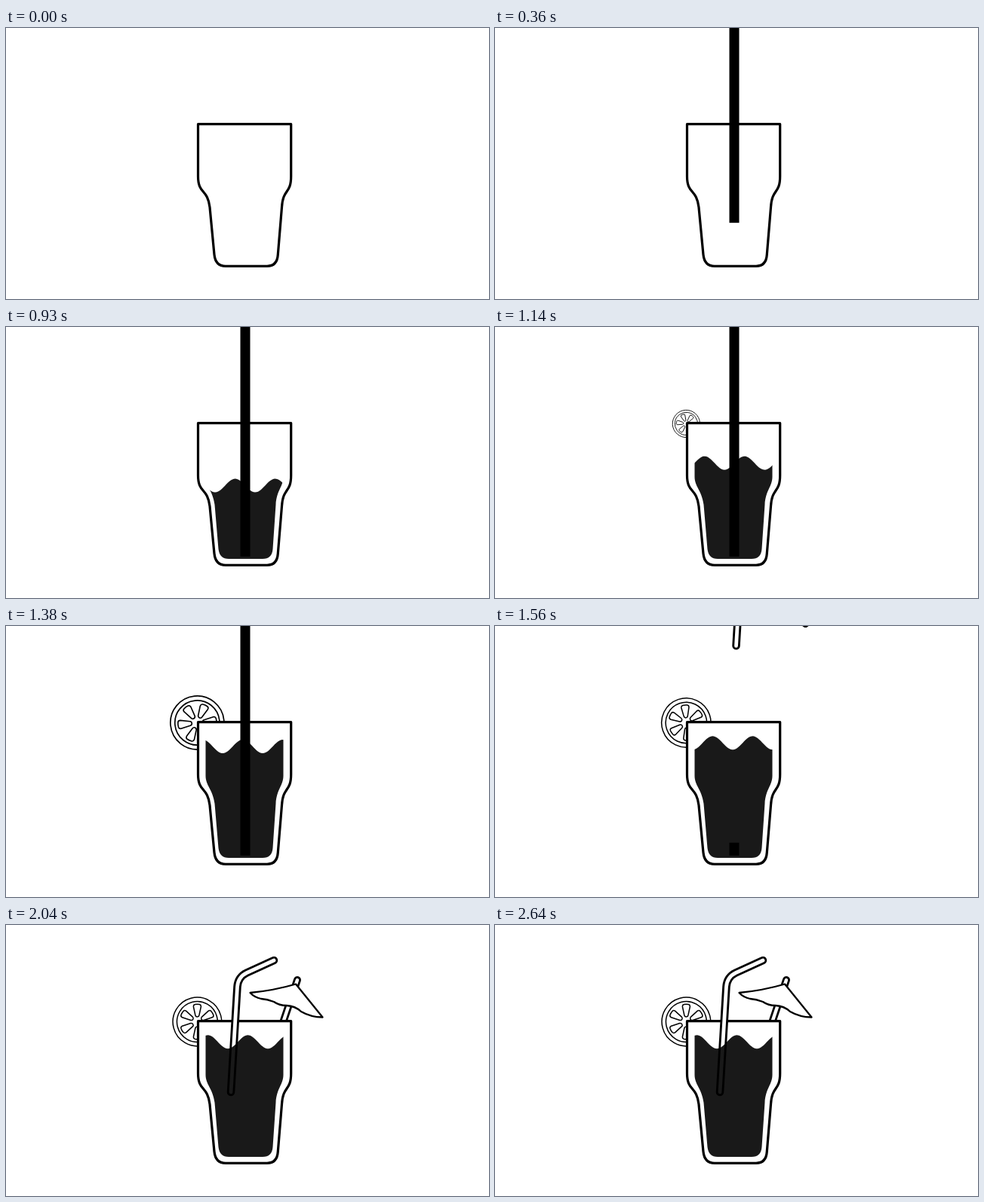
Write an HTML page that moves like this. It is 640x360 px and loops after 2700 ms.

```html
<!DOCTYPE html>
<html lang="en">
<head>
<meta charset="utf-8">
<title>Drink</title>
<style>
  html, body { margin: 0; height: 100%; overflow: hidden; background: #fff; }
  svg { display: block; width: 100%; height: 100%; }
  path, line, circle { fill: none; stroke: #000; }
  .tube path { stroke-linecap: round; }
  .tube .core { stroke: #fff; }
</style>
</head>
<body>
<svg viewBox="0 0 640 360">
  <defs>
    <clipPath id="inside">
      <path d="M264.500 128H367.500V199C367.500 212 358.500 217 357.500 236L353.500 295Q352.500 308 340 308H295Q283 308 281.500 295L276.500 236C274 217 264.500 212 264.500 199Z"/>
    </clipPath>
    <path id="segment" stroke-width="1.500" stroke-linejoin="round"
          d="M8.500 -2.500L20 -5Q22.500 -5.200 23 -3Q23.600 0 23 3Q22.500 5.200 20 5L8.500 2.500Q6.500 2 6.500 0Q6.500 -2 8.500 -2.500Z"/>
  </defs>

  <g id="lemon">
    <circle r="32.300" stroke-width="1.500"/>
    <circle r="26.900" stroke-width="1.500"/>
    <g id="segments"></g>
  </g>

  <g id="umbrella" class="tube">
    <path d="M386 73L330 240" stroke-width="10"/>
    <path class="core" d="M386 73L330 240" stroke-width="4.400"/>
    <path d="M323.500 90Q355 87 384 78.500Q399 97 419.500 122.500Q404 122.500 391 115Q383 107.500 372 107Q362 107 355 102Q346 98.500 338 98Q329 96 323.500 90Z"
          style="fill:#fff" stroke-width="2.300" stroke-linejoin="round"/>
  </g>

  <path d="M254.500 127.700H377.700V197C377.700 221 367 213 365.500 238L360.300 301Q359.300 316.300 346 316.300H291Q277.500 316.300 276 301L270 238C267 213 254.500 221 254.500 197Z"
        style="fill:#fff" stroke-width="3.200" stroke-linejoin="round"/>

  <line id="stream" x1="317" x2="317" stroke-width="13"/>
  <g id="straw" class="tube">
    <path d="M355 47L319 63.500Q307.500 69 306.500 82L298 222" stroke-width="10.500"/>
    <path class="core" d="M355 47L319 63.500Q307.500 69 306.500 82L298 222" stroke-width="4.800"/>
  </g>
  <g clip-path="url(#inside)">
    <path id="liquid" style="fill:#000;fill-opacity:.9;stroke:none"/>
  </g>
</svg>
<script>
const LOOP = 2700;
const $ = id => document.getElementById(id);
const progress = (t, from, to) => Math.min(1, Math.max(0, (t - from) / (to - from)));
const easeInOut = p => (1 - Math.cos(Math.PI * p)) / 2;
const easeOut = p => Math.sin(Math.PI * p / 2);
const easeOutBack = p => 1 + 2.70158 * (p - 1) ** 3 + 1.70158 * (p - 1) ** 2;

$('segments').innerHTML = [0, 60, 120, 180, 240, 300]
  .map(a => `<use href="#segment" transform="rotate(${a})"/>`).join('');

// Horizontal place of one wave trough as [time, x]
const drift = [[420, 211], [720, 250], [1140, 304], [1380, 340], [1770, 400]];

function troughAt(t) {
  let x = drift[0][1];
  for (let i = 1; i < drift.length; i++) {
    const [t0, x0] = drift[i - 1], [t1, x1] = drift[i];
    x += (x1 - x0) * progress(t, t0, t1);
  }
  return x;
}

function liquidPath(t) {
  const level = 312 - 156.7 * easeOut(progress(t, 420, 1560));
  const height = 9 * progress(t, 420, 570);
  const trough = troughAt(t);
  let d = 'M262 320';
  for (let x = 262; x <= 370; x += 2)
    d += `L${x} ${(level + height * Math.cos((x - trough) / 53 * 2 * Math.PI)).toFixed(2)}`;
  return d + 'V320Z';
}

function slide(id, distance, slope, p) {
  const rise = distance * (1 - easeInOut(p));
  $(id).setAttribute('transform', `translate(${rise * slope} ${-rise})`);
}

function draw(t) {
  $('stream').setAttribute('y1', 305 * progress(t, 1410, 1570));
  $('stream').setAttribute('y2', 305 * progress(t, 30, 420));
  $('liquid').setAttribute('d', liquidPath(t));

  // One full backward turn while growing
  const grow = Math.max(0, easeOutBack(progress(t, 1060, 1610)));
  $('lemon').setAttribute('visibility', t > 1060 ? 'visible' : 'hidden');
  $('lemon').setAttribute('transform',
    `translate(253.400 128.500) rotate(${30 - 360 * grow}) scale(${grow})`);

  slide('straw', 250, 0.11, progress(t, 1440, 1832));
  slide('umbrella', 270, 0.335, progress(t, 1440, 2030));
}

const start = performance.now();
function frame() {
  draw((performance.now() - start) % LOOP);
  requestAnimationFrame(frame);
}
frame();
</script>
</body>
</html>
```
